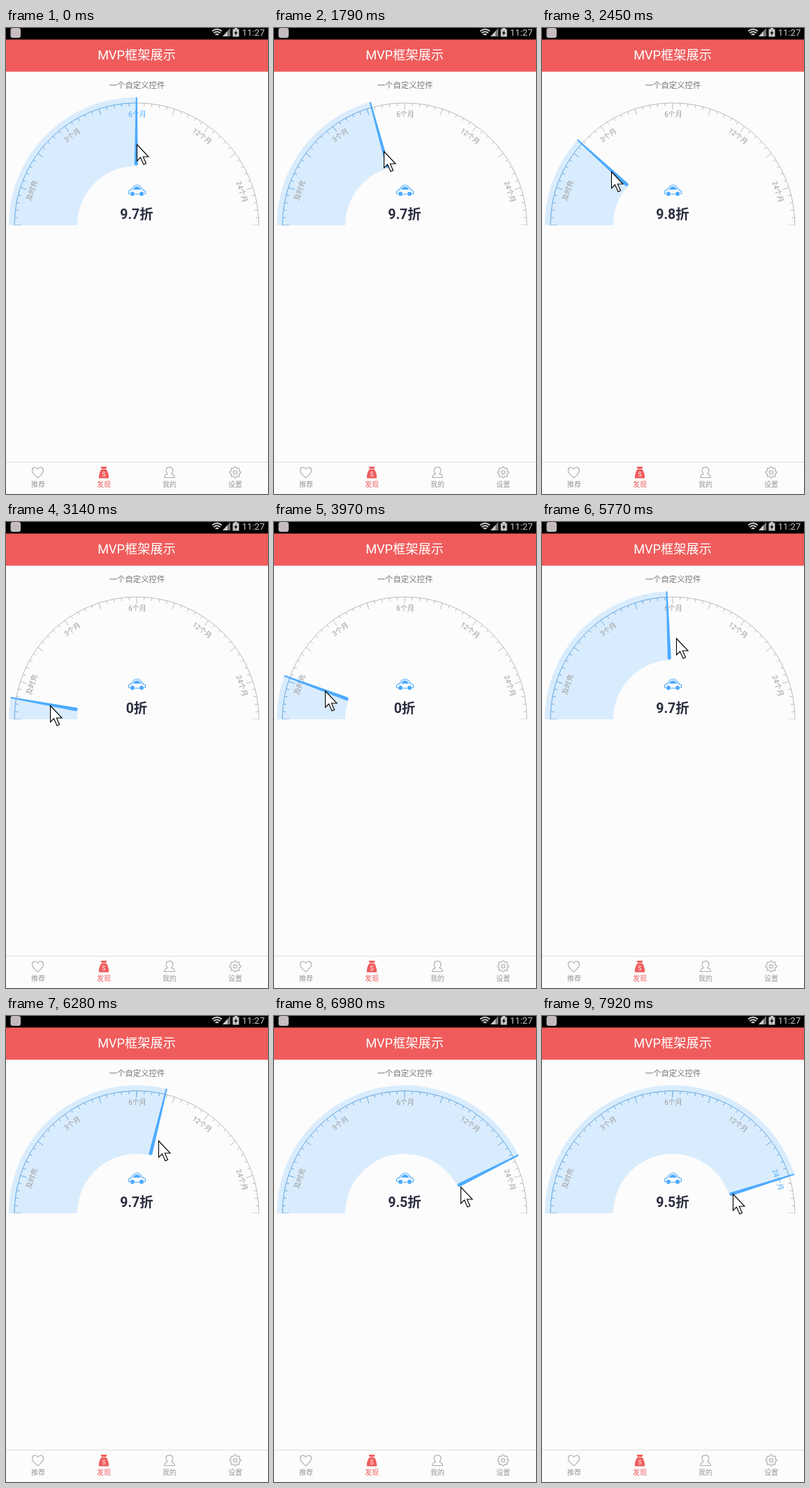
An HTML page for the animation above (8 s loop, 375 by 666 pixels).

```html
<!DOCTYPE html>
<html lang="zh">
<head>
<meta charset="utf-8">
<title>Dial</title>
<style>
html, body { margin: 0; width: 100%; height: 100%; overflow: hidden; background: #fcfcfc; }
svg { display: block; width: 375px; height: 666px; }
text { font-family: Roboto, "Noto Sans CJK SC", "Noto Sans CJK", sans-serif; text-anchor: middle; }
.line { fill: none; stroke: #aaa; stroke-width: 1.1; stroke-linejoin: round; stroke-linecap: round; }
</style>
</head>
<body>
<svg viewBox="0 0 375 666">
  <clipPath id="half"><rect width="375" height="282"/></clipPath>
  <rect width="375" height="666" fill="#fcfcfc"/>
  <rect width="375" height="17" fill="#000"/>
  <rect y="16.500" width="375" height="46" fill="#f05c5c"/>

  <rect x="6.500" y="0" width="14.500" height="14" rx="3" fill="#c4bcc0"/>
  <g fill="#c8c8c8">
    <path d="M295 4.500Q302 -1 309 4.500M297.300 7.200Q302 3.400 306.700 7.200M299.800 9.800Q302 8 304.200 9.800" fill="none" stroke="#c8c8c8" stroke-width="2"/>
    <path d="M321 0V12H310Z" fill="#777"/>
    <path d="M317 4.500V12H310Z"/>
    <path d="M327 0H331V1.500H333.500V12.500H324.500V1.500H327Z"/>
    <path d="M329.800 3L326.500 7.700H328.600L328 11L331.500 6.200H329.300Z" fill="#000"/>
    <text x="354" y="11" font-size="13">11:27</text>
  </g>
  <text x="187" y="45" font-size="18.200" fill="#fff">MVP框架展示</text>
  <text x="187.500" y="86" font-size="11.400" fill="#777">一个自定义控件</text>

  <path id="sector" fill="#d9ecfd"/>
  <g clip-path="url(#half)" fill="none" stroke-width=".9">
    <path id="scale" stroke="#b4b4b4"/>
    <path id="done" stroke="#68b6f8"/>
  </g>
  <g id="labels" font-size="10"></g>
  <path id="needle" fill="#4caaff"/>

  <g fill="none" stroke="#4caaff" stroke-width="1.200" stroke-linejoin="round">
    <path d="M177.500 237Q174.500 237 175.500 233.500Q177 231.300 180 230.800Q182.500 224.500 187.500 224.500Q192.500 224.500 195 230.800Q198 231.300 199.500 233.500Q200.500 237 197.500 237M184.500 237.500H190.500"/>
    <path d="M182.800 230.500Q184.300 227 187.500 227Q190.700 227 192.200 230.500Z" fill="#4caaff"/>
    <circle cx="181" cy="237" r="2.400" fill="#4caaff"/>
    <circle cx="194" cy="237" r="2.400" fill="#4caaff"/>
  </g>
  <text id="value" x="187" y="273" font-size="19.500" font-weight="700" fill="#2b2d40"></text>

  <path d="M0 620.500H375" stroke="#dedede"/>
  <path class="line" d="M45.500 643C41 639 37.500 636.500 37.500 632.500C37.500 627.500 43 626.500 45.500 630.500C48 626.500 53.500 627.500 53.500 632.500C53.500 636.500 50 639 45.500 643Z"/>
  <path d="M135.500 627H144.500L143 630.500C145.500 633 147.500 638 147 643.500H133C132.500 638 134.500 633 137 630.500Z" fill="#f05c5c"/>
  <path d="M136 630.500H144" stroke="#fcfcfc" stroke-width=".7"/>
  <text x="140" y="640.500" font-size="8.500" fill="#fff">S</text>
  <path class="line" d="M231.300 637.300C227 632 229.500 627.500 234 627.500S241 632 236.700 637.300Q241 638.500 241.500 642.500H226.500Q227 638.500 231.300 637.300Z"/>
  <path id="gear" class="line"/>
  <circle class="line" cx="328" cy="635" r="2.500"/>
  <g id="tabs" font-size="10"></g>

  <path id="cursor" d="M.5 .5V24L5.500 19L10 29L13.500 27.500L9.300 18H17Z" fill="#fff" stroke="#000" stroke-width="1.100"/>
</svg>
<script>
const $ = id => document.getElementById(id);
const LOOP = 8000, DRAG_START = 950, STEP = 136.6;
const CX = 187, CY = 282;
const R = { outer: 183, scale: 175, label: 158.5, inner: 85 };
const BLUE = '#4caaff', GREY = '#999';
const MARKS = ['及时充', '3个月', '6个月', '12个月', '24个月'];
const RATES = ['0', '9.8', '9.7', '9.6', '9.5'];
const markAngle = i => 18 + 36 * i;

// The drag: step, needle angle, pointer angle, pointer distance
const DRAG = [
  [-1, 90, 90, 116],
  [6, 74.4, 74.2, 110],
  [7, 58, 57, 113],
  [16, 9.8, 9.2, 125.6],
  [18, 6, 3.7, 125],
  [27, 37.4, 39.7, 115.7],
  [31, 52, 54, 113],
  [35, 87.4, 92.5, 116],
  [41, 111.7, 114, 105],
  [44, 153, 154.6, 88.6],
  [49, 179, 180.5, 89],
  [51, 162.3, 162, 90.4]
];

function polar(angle, r, side = 0) {
  const a = angle * Math.PI / 180, c = Math.cos(a), s = Math.sin(a);
  return [CX - r * c + side * s, CY - r * s - side * c];
}
const at = (angle, r, side) => polar(angle, r, side).map(n => n.toFixed(2)).join(' ');
const arc = (r, angle, sweep) => `A${r} ${r} 0 0 ${sweep} ${at(angle, r)}`;

function scalePath(end) {
  let d = `M${at(0, R.scale)}${arc(R.scale, end, 1)}`;
  for (let i = 0; i <= 50 && i * 3.6 <= end; i++) {
    d += `M${at(i * 3.6, R.scale)}L${at(i * 3.6, R.scale - (i % 5 ? 4.5 : 9.5))}`;
  }
  return d;
}

function addText(parent, x, y, content, fill) {
  const el = document.createElementNS('http://www.w3.org/2000/svg', 'text');
  el.setAttribute('x', x);
  el.setAttribute('y', y);
  el.setAttribute('fill', fill);
  el.textContent = content;
  return parent.appendChild(el);
}

const labels = MARKS.map((name, i) => {
  const el = addText($('labels'), 1, 3.8, name, GREY);
  el.setAttribute('transform', `translate(${at(markAngle(i), R.label)}) rotate(${markAngle(i) - 90})`);
  return el;
});
['推荐', '发现', '我的', '设置'].forEach((name, i) =>
  addText($('tabs'), 46 + 94 * i, 656, name, i === 1 ? '#f05c5c' : GREY));

$('scale').setAttribute('d', scalePath(180));
$('gear').setAttribute('d', 'M' + Array.from({ length: 32 }, (_, i) => {
  const a = (i - .5) * Math.PI / 16, r = i % 4 < 2 ? 8 : 6.3;
  return `${(328 + r * Math.cos(a)).toFixed(2)} ${(635 + r * Math.sin(a)).toFixed(2)}`;
}).join('L') + 'Z');

// The screen refreshes in even steps once the drag begins
function pose(time) {
  const step = Math.max(-1, Math.floor((time - DRAG_START) / STEP));
  const i = DRAG.findLastIndex(key => key[0] <= step);
  const a = DRAG[i], b = DRAG[i + 1];
  if (!b) return a;
  const k = (step - a[0]) / (b[0] - a[0]);
  return a.map((v, n) => v + (b[n] - v) * k);
}

function render(time) {
  const [, angle, handAngle, handRadius] = pose(time);
  $('sector').setAttribute('d',
    `M${at(0, R.outer)}${arc(R.outer, angle, 1)}L${at(angle, R.inner)}${arc(R.inner, 0, 0)}Z`);
  $('done').setAttribute('d', scalePath(angle));
  $('needle').setAttribute('d',
    `M${at(angle, R.outer, -1.2)}L${at(angle, 88, -3.2)}A2.5 2.5 0 0 0 ${at(angle, 88, 1.8)}L${at(angle, R.outer, .8)}Z`);
  labels.forEach((el, i) =>
    el.setAttribute('fill', Math.abs(angle - markAngle(i)) < 1 ? BLUE : GREY));
  const nearest = Math.max(0, Math.min(4, Math.round((angle - 18) / 36)));
  $('value').textContent = RATES[nearest] + '折';
  const [x, y] = polar(handAngle, handRadius).map(Math.round);
  $('cursor').setAttribute('transform', `translate(${x} ${y})`);
}

const start = performance.now();
function frame() {
  render((performance.now() - start) % LOOP);
  requestAnimationFrame(frame);
}
frame();
</script>
</body>
</html>
```
